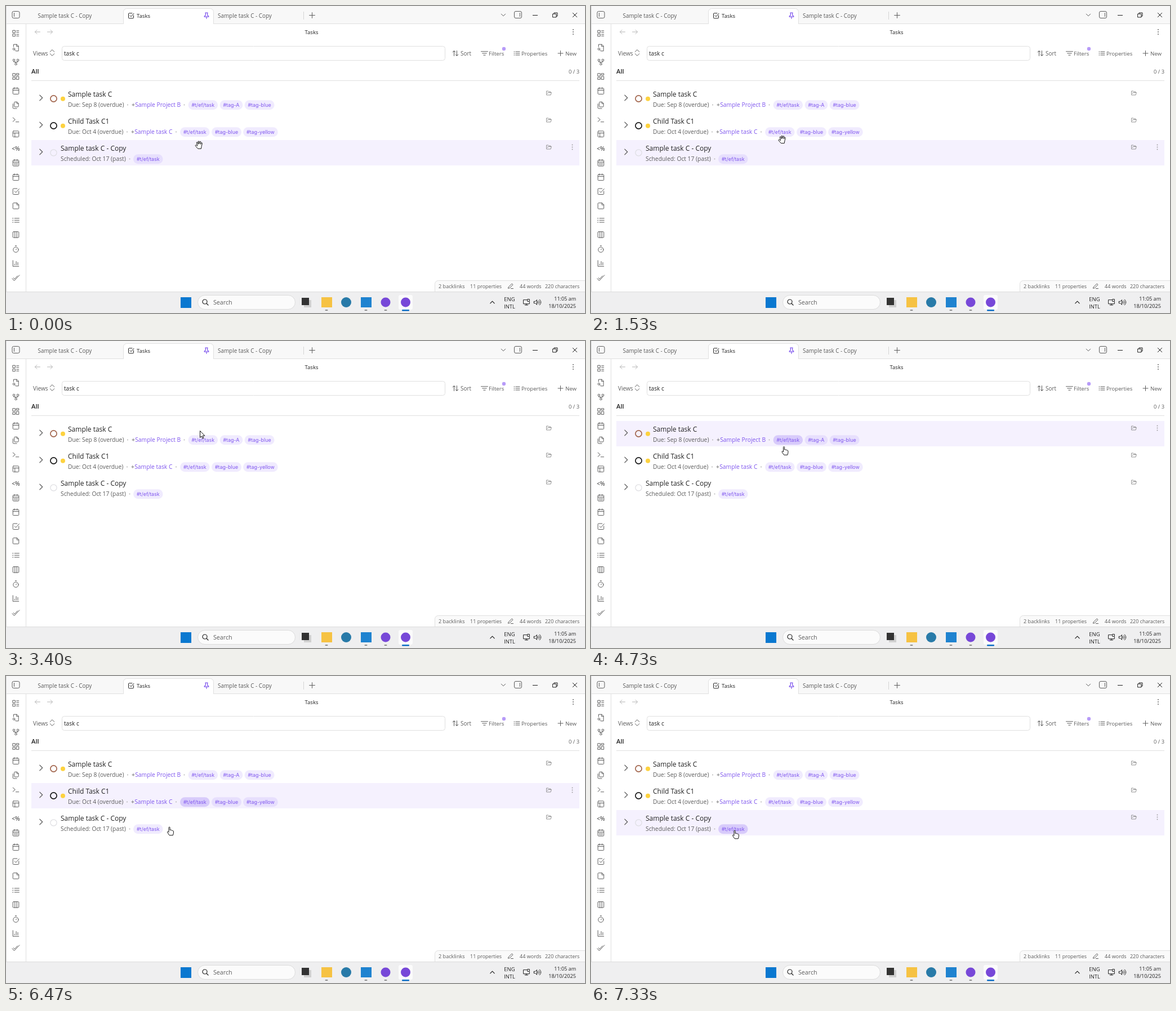
These frames come from a looping animation (1028 by 545 pixels, 8 s). An HTML page with a canvas:

```html
<!DOCTYPE html>
<html lang="en">
<head>
<meta charset="utf-8">
<title>Tasks</title>
<style>
  html, body { margin: 0; width: 100%; height: 100%; overflow: hidden; background: #fff; }
  canvas { display: block; }
</style>
</head>
<body>
<canvas id="stage" width="1028" height="545"></canvas>
<script>
const ctx = document.getElementById('stage').getContext('2d');
const LOOP = 8000, FPS = 15;
const UI = '"Open Sans", "Noto Sans", sans-serif';
const TAG = 'Inter, "Liberation Sans", sans-serif';
const INK = '#222', MUTED = '#5c5c5c', LINE = '#e0e0e0', ACCENT = '#7f56ee';

// Icons on a 24 unit grid
const CAL = 'M8 2v4M16 2v4M3 10h18M5 4h14a2 2 0 0 1 2 2v14a2 2 0 0 1-2 2H5a2 2 0 0 1-2-2V6a2 2 0 0 1 2-2z';
const BOX = 'M5 3h14a2 2 0 0 1 2 2v14a2 2 0 0 1-2 2H5a2 2 0 0 1-2-2V5a2 2 0 0 1 2-2z';
const RING = 'a3 3 0 1 1-6 0 3 3 0 0 1 6 0z';
const ICON = {
  layout: 'M3 3h7v7H3zM3 14h7v7H3zM14 4h7M14 9h7M14 15h7M14 20h7',
  fileSearch: 'M14 2v6h6M5 9V2h10l5 5v15h-8M9 16' + RING + 'M8 18l3 3',
  fork: `M9 6${RING}M21 6${RING}M15 18${RING}M18 9v3H6V9M12 12v3`,
  dashboard: 'M3 3h7v8H3zM14 3h7v5h-7zM14 12h7v9h-7zM3 15h7v6H3z',
  calendar: CAL,
  files: 'M15 2H9a2 2 0 0 0-2 2v11a2 2 0 0 0 2 2h9a2 2 0 0 0 2-2V7zV7h5M3 8v12a2 2 0 0 0 2 2h10',
  terminal: 'M3 18l7-6-7-6M12 19h9',
  panels: BOX + 'M3 9h18M9 9v12',
  days: CAL + 'M7 14h2M11 14h2M15 14h2M7 18h2M11 18h2M15 18h2',
  check: 'M21 11v8a2 2 0 0 1-2 2H5a2 2 0 0 1-2-2V5a2 2 0 0 1 2-2h11M8 11l4 4L22 4',
  note: 'M15 3H5a2 2 0 0 0-2 2v14a2 2 0 0 0 2 2h14a2 2 0 0 0 2-2V9zV9h6',
  list: 'M8 6h14M8 12h14M8 18h14M2 6h2M2 12h2M2 18h2',
  columns: BOX + 'M9 3v18M15 3v18',
  timer: 'M10 2h4M12 14l3-3M20 14a8 8 0 1 1-16 0 8 8 0 0 1 16 0z',
  chart: 'M3 3v18h18M8 17v-3M13 17V6M18 17v-8',
  tick: 'M1 14l6 7L23 4M5 12l3 4L17 6',
  left: 'M21 12H3M10 5l-7 7 7 7',
  right: 'M3 12h18M14 5l7 7-7 7',
  plus: 'M12 3v18M3 12h18',
  close: 'M4 4l16 16M20 4L4 20',
  down: 'M4 8l8 8 8-8',
  up: 'M4 16l8-8 8 8',
  next: 'M8 3l9 9-9 9',
  pin: 'M12 16v6M8 3h8M9 3v8l-4 3v2h14v-2l-4-3V3',
  updown: 'M5 9l7-7 7 7M5 15l7 7 7-7',
  sort: 'M2 8l5-5 5 5M7 3v18M12 16l5 5 5-5M17 21V3',
  filter: 'M1 6h22M5 12h14M9 18h6',
  folder: 'M6 14l2-4h14l-3 10H2V4h7l3 3h7v3',
  pencil: 'M4 16L17 3l4 4L8 20l-5 1zM13 22h9',
  search: 'M18 10a8 8 0 1 1-16 0 8 8 0 0 1 16 0zM16 16l6 6',
  restore: 'M4 8h12v12H4zM8 8V4h12v12h-4',
  screen: 'M14 4H2v13h20v-6M7 21h10M12 17v4M16 2h6v7h-6z',
  sound: 'M3 9h4l5-5v16l-5-5H3zM15 9c2 2 2 4 0 6M18 6c4 4 4 8 0 12M21 3c6 6 6 12 0 18'
};
const RIBBON = ['layout', 'fileSearch', 'fork', 'dashboard', 'calendar', 'files', 'terminal', 'panels', '',
  'days', 'calendar', 'check', 'note', 'list', 'columns', 'timer', 'chart', 'tick'];

const ROWS = [
  { title: 'Sample task C', x: 110, due: 'Due: Sep 8 (overdue)', ring: '#a3674f', dot: 1,
    project: ['Sample Project B', 223], seps: [216, 316.5],
    tags: [['#t/ef/task', 323.5], ['#tag-A', 379.5], ['#tag-blue', 423.5]] },
  { title: 'Child Task C1', x: 110, due: 'Due: Oct 4 (overdue)', ring: '#1a1a1a', dot: 1,
    project: ['Sample task C', 222], seps: [215, 302],
    tags: [['#t/ef/task', 309], ['#tag-blue', 365], ['#tag-yellow', 421]] },
  { title: 'Sample task C - Copy', x: 97, due: 'Scheduled: Oct 17 (past)', ring: '#dedee2',
    seps: [219.5], tags: [['#t/ef/task', 226]] }
];

// Pointer path: frame, x, y
const PATH = [[2, 342.5, 246.5], [6, 322, 281], [9, 309, 311], [12, 320, 318.5], [15, 320, 318.5],
  [21, 333, 262], [28, 355, 174], [29, 357, 173], [33, 350, 177], [38, 350, 177], [42, 369, 141],
  [44, 369, 141], [45, 367, 139], [50, 367, 139], [51, 344.5, 159.5], [53, 343, 168], [58, 346, 177],
  [70, 346, 177], [71, 342.5, 187.5], [79, 334, 221], [96, 334, 221], [97, 290, 268], [101, 272, 284],
  [107, 257, 275.5], [109, 257, 275.5], [110, 255, 274]];
const CURSOR = {
  grab: [7, 7.7, 'M4.2 8.5L2.9 4.2C2.5 2.7 4.3 2.2 4.8 3.6L5.9 6.5 5.7 2.2C5.7 .8 7.5 .8 7.6 2.2L7.9 6 8.6 2.4C8.9 1.1 10.6 1.4 10.5 2.8L10.2 6.6 11.3 4.6C12 3.4 13.4 4.2 12.9 5.4L11.8 9.5 10.9 14.5H5.2L1 9.8C0 8.6 1.5 7.4 2.6 8.2L4.2 9.7z'],
  arrow: [0, 0, 'M0 0V12L2.7 9.4 4.6 13.6 6.4 12.8 4.6 8.7H8.4z'],
  point: [4.2, .6, 'M3.2 9V1.8C3.2 .2 5.3 .2 5.3 1.8V6.2C6 5.4 7.4 5.7 7.5 6.6 8.3 5.9 9.5 6.3 9.6 7.3 10.5 6.8 11.6 7.4 11.6 8.4V11.5L10.5 15.4H4.3L.9 10.4C.2 9.3 1.5 8.2 2.4 9L3.2 10z']
};

function text(s, x, y, size, color = INK, align = 'left', font = UI, weight = 400) {
  ctx.font = `${weight} ${size}px ${font}`;
  ctx.textAlign = align;
  ctx.fillStyle = color;
  ctx.fillText(s, x, y);
}
function rect(x, y, w, h, color) {
  ctx.fillStyle = color;
  ctx.fillRect(x, y, w, h);
}
function round(x, y, w, h, r, fill, stroke) {
  ctx.beginPath();
  ctx.roundRect(x, y, w, h, r);
  if (fill) { ctx.fillStyle = fill; ctx.fill(); }
  if (stroke) { ctx.strokeStyle = stroke; ctx.lineWidth = 1; ctx.stroke(); }
}
function disc(x, y, r, color) {
  ctx.beginPath();
  ctx.arc(x, y, r, 0, 7);
  ctx.fillStyle = color;
  ctx.fill();
}
function icon(name, x, y, size = 13, color = MUTED, width = 1) {
  const k = size / 24;
  ctx.save();
  ctx.translate(x - size / 2, y - size / 2);
  ctx.scale(k, k);
  ctx.lineWidth = width / k;
  ctx.lineCap = ctx.lineJoin = 'round';
  ctx.strokeStyle = color;
  ctx.stroke(new Path2D(ICON[name]));
  ctx.restore();
}
function dots(x, y, color) {
  for (const d of [-4, 0, 4]) disc(x, y + d, .9, color);
}
function sidebar(x, bar) {
  round(x - 6.5, 9.5, 13, 12, 2.5, null, MUTED);
  rect(bar, 12, 1, 7, MUTED);
}

function drawWindow() {
  rect(0, 0, 1028, 545, '#fff');
  rect(0, 0, 1028, 31, '#f8f8f8');
  rect(0, 31, 1028, 1, LINE);
  rect(35, 31, 1, 476, LINE);
  rect(0, 0, 1, 507, '#d8d8d8');
  round(208.5, 4.5, 160, 34, [6, 6, 0, 0], '#fff', LINE);
  rect(207, 32, 164, 8, '#fff');

  sidebar(17.5, 14);
  text('Sample task C - Copy', 56.5, 21.4, 9.9, MUTED);
  icon('check', 222, 17.3, 12, INK);
  text('Tasks', 232, 21.4, 9.6);
  icon('pin', 356, 17, 13, ACCENT, 1.2);
  text('Sample task C - Copy', 376, 21.4, 9.9, MUTED);
  rect(528, 10, 1, 14, '#d4d4d4');
  icon('plus', 543.5, 16.5, 13);
  icon('down', 883, 16, 11);
  sidebar(909, 912);
  rect(935, 16, 9, 1, INK);
  icon('restore', 975, 16, 12, INK);
  icon('close', 1010, 16, 11, INK);

  icon('left', 56, 46, 12, '#b5b5b5');
  icon('right', 78, 46, 12, '#b5b5b5');
  text('Tasks', 542.5, 50, 9.5, INK, 'center');
  dots(1007, 46, MUTED);

  RIBBON.forEach((name, i) => {
    const y = 48.5 + i * 25.53;
    if (name) icon(name, 17.5, y, 14);
    else text('<%', 17.5, y + 4, 10, MUTED, 'center', UI, 600);
  });
}

function drawToolbar() {
  text('Views', 48, 88.1, 10.1, MUTED);
  icon('updown', 82, 83, 13);
  round(99.5, 71.5, 680, 25, 4, '#fff', LINE);
  text('task c', 103, 88.1, 10.1);
  icon('sort', 798, 84, 12);
  text('Sort', 807, 88.1, 9.9, MUTED);
  icon('filter', 849.5, 84, 13);
  text('Filters', 857, 88.1, 9.7, MUTED);
  disc(884, 76, 3.2, '#b79bf8');
  icon('list', 907, 84, 12);
  text('Properties', 915, 88.1, 9.6, MUTED);
  icon('plus', 984.5, 84, 12);
  text('New', 993, 88.1, 9.7, MUTED);
  text('All', 45, 120.3, 11.2, INK, 'left', UI, 600);
  text('0 / 3', 1018, 120, 9.3, MUTED, 'right');
  rect(45, 132, 973, 1, LINE);
}

function drawRow(row, i, active, hover) {
  const y = 142 + i * 48;
  if (active) rect(45, y, 973, 45, '#f5f1fe');
  icon('next', 62, y + 21, 13, MUTED, 1.3);
  ctx.beginPath();
  ctx.arc(84.5, y + 22.5, 5.6, 0, 7);
  ctx.strokeStyle = row.ring;
  ctx.lineWidth = i === 2 ? 1.2 : 1.7;
  ctx.stroke();
  if (row.dot) disc(101, y + 22.7, 4, '#fdd23f');
  text(row.title, row.x, y + 19, 12);
  text(row.due, row.x, y + 37.3, 10.3, MUTED);
  for (const x of row.seps) disc(x, y + 33.5, 1, '#b5b5b5');
  if (row.project) {
    text('+', row.project[1], y + 37.3, 10.3, MUTED);
    text(row.project[0], row.project[1] + 6.2, y + 37.3, 10.3, ACCENT);
  }
  row.tags.forEach(([name, x], n) => {
    ctx.font = `8.9px ${TAG}`;
    const lit = hover && n === 0;
    round(x, y + 25.3, ctx.measureText(name).width + 12, 17, 8.5, `rgba(128,88,240,${lit ? .25 : .12})`);
    text(name, x + 6, y + 37.2, 8.9, ACCENT, 'left', TAG);
  });
  icon('folder', 964, y + 12.5, 10.5, '#8a8a8a', .9);
  if (active) dots(1005.5, y + 12.5, '#9a9a9a');
}

function drawStatus() {
  round(761.5, 487.5, 280, 30, [6, 0, 0, 0], '#fafafa', LINE);
  text('2 backlinks', 768, 500.5, 9.1, MUTED);
  text('11 properties', 824, 500.5, 9, MUTED);
  icon('pencil', 896, 497, 11);
  text('44 words', 912, 500.5, 9.05, MUTED);
  text('220 characters', 957, 500.5, 8.95, MUTED);
}

function drawTaskbar() {
  rect(0, 507, 1028, 38, '#efeff0');
  rect(0, 507, 1028, 1, '#dcdcdc');
  rect(310, 517, 19, 19, '#0a78d0');
  round(340.5, 513.5, 173, 25, 12.5, '#fbfbfb', '#dcdcdc');
  icon('search', 354, 526, 12, INK, 1.2);
  text('Search', 368, 530, 10.7, MUTED);
  rect(529, 522, 13, 13, '#d0d0d0');
  rect(525, 518, 13, 13, '#333');
  round(697, 513, 25, 26, 3, '#fbfbfb');
  rect(560, 517, 19, 18, '#f6c243');
  disc(604, 526, 9, '#287aa8');
  rect(630, 517, 19, 18, '#1f83d0');
  disc(674, 526, 8.5, '#7748d8');
  disc(709.5, 526, 8.5, '#7748d8');
  for (const x of [569, 639, 674]) round(x - 2.5, 539, 5, 2, 1, '#8c8c8c');
  round(703, 539, 13, 2.5, 1, '#0a6cc4');
  icon('up', 863.5, 526, 11, INK, 1.2);
  text('ENG', 894, 524, 9.5, INK, 'center');
  text('INTL', 894, 537, 9.3, INK, 'center');
  icon('screen', 924, 526, 13, INK);
  icon('sound', 942.5, 526, 13, INK);
  text('11:05 am', 1012, 523, 9, INK, 'right');
  text('18/10/2025', 1012, 536, 9.2, INK, 'right');
}

function pointerAt(f) {
  const i = PATH.findIndex(p => p[0] > f);
  if (i === 0) return PATH[0].slice(1);
  if (i < 0) return PATH[PATH.length - 1].slice(1);
  const [a, ax, ay] = PATH[i - 1], [b, bx, by] = PATH[i];
  const u = (f - a) / (b - a);
  return [ax + (bx - ax) * u, ay + (by - ay) * u];
}

function drawCursor(f) {
  const [x, y] = pointerAt(f);
  const [dx, dy, d] = CURSOR[f < 45 ? 'grab' : f < 53 ? 'arrow' : 'point'];
  const shape = new Path2D(d);
  ctx.save();
  ctx.translate(x - dx, y - dy);
  ctx.fillStyle = '#fff';
  ctx.strokeStyle = '#111';
  ctx.lineWidth = 1;
  ctx.lineJoin = 'round';
  ctx.fill(shape);
  ctx.stroke(shape);
  ctx.restore();
}

function draw(ms) {
  const f = Math.floor(ms * FPS / 1000 + .2);
  const active = f < 45 ? 2 : f < 52 ? -1 : f < 72 ? 0 : f < 98 ? 1 : 2;
  const hover = (f >= 54 && f < 72) || (f >= 78 && f < 98) || f >= 105;
  drawWindow();
  drawToolbar();
  ROWS.forEach((row, i) => drawRow(row, i, i === active, hover && i === active));
  drawStatus();
  drawTaskbar();
  drawCursor(f);
}

const start = performance.now();
function tick() {
  draw((performance.now() - start) % LOOP);
  requestAnimationFrame(tick);
}
tick();
</script>
</body>
</html>
```
